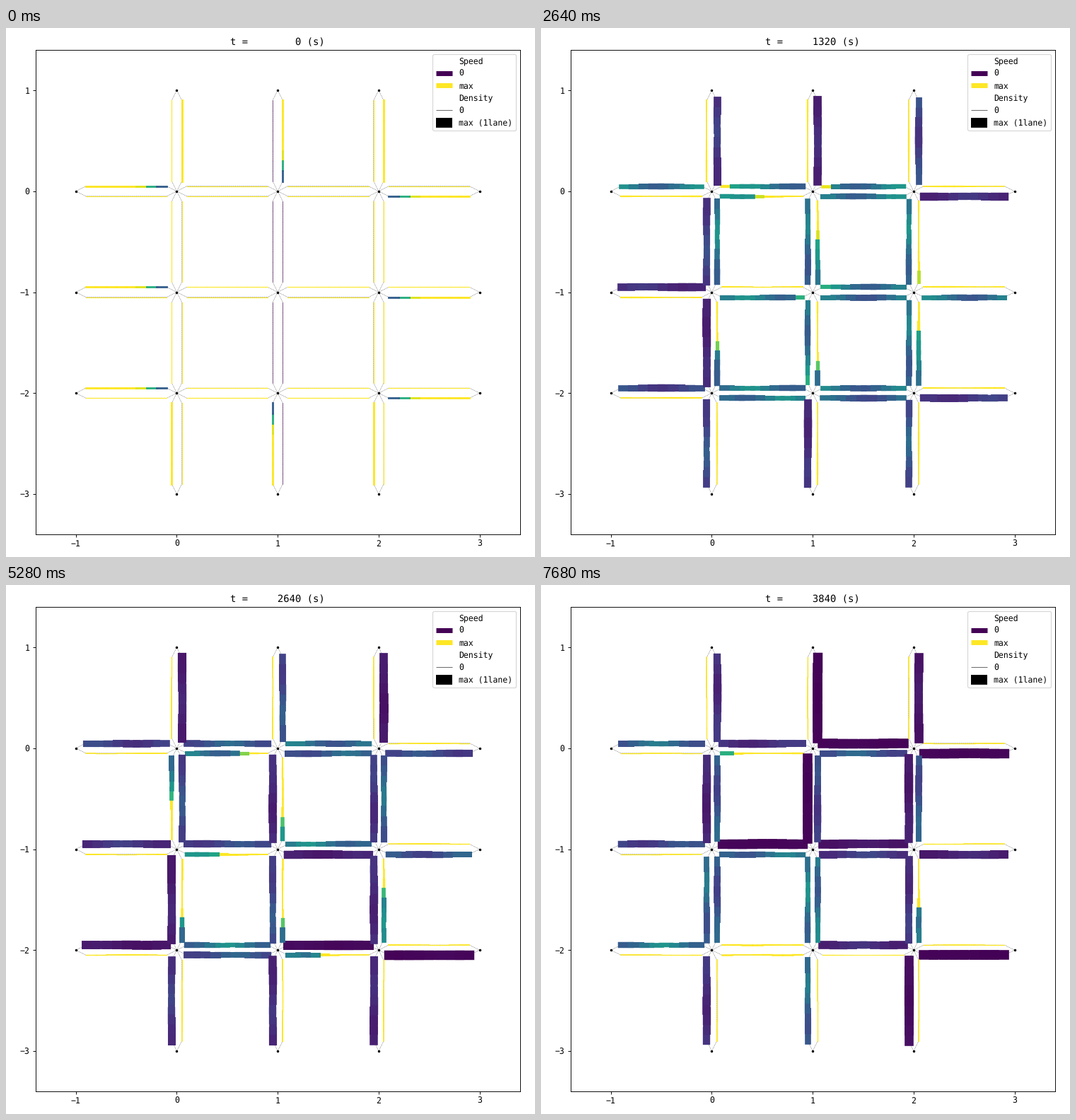
A matplotlib script for the animation above (7920 ms loop, 748 by 748 pixels).

```python
import matplotlib.pyplot as plt
import numpy as np
from matplotlib.animation import FuncAnimation
from matplotlib.collections import LineCollection
from matplotlib.lines import Line2D

SIZE = 748
FRAMES, INTERVAL, STEP = 33, 240, 120
KEYS = [0, 7, 17, 24, 32]
CELLS = 8
MIN_W, MAX_W = 0.5, 12
HEADING = {"N": (0, 1), "S": (0, -1), "E": (1, 0), "W": (-1, 0)}
START = {"N": -3, "S": 1, "E": -1, "W": 3}

plt.rcParams.update({"font.family": "DejaVu Sans Mono", "text.hinting": "none"})
viridis = plt.colormaps["viridis"]
rng = np.random.default_rng(4)

lanes, paths, levels, queued = [], [], [], []


def road(x, y, way, loads, queue=False):
    """One-way road leaving node (x, y), with its load in percent at KEYS."""
    dx, dy = HEADING[way]
    s = np.linspace(0.1, 0.9, CELLS + 1)
    mid = np.column_stack([x + dx * s - dy * 0.05, y + dy * s + dx * 0.05])
    lanes.extend(np.stack([mid[:-1], mid[1:]], axis=1))
    paths.append(np.vstack([(x, y), mid, (x + dx, y + dy)]))
    levels.append(np.array(loads) / 100)
    queued.append(queue)


def street(way, line, entry, first, second):
    """Entry road, two inner roads and a free-flowing exit in a row."""
    dx, dy = HEADING[way]
    idle = dy != 0 and line == 1
    inside = 0 if idle else 4
    chain = [(17, *entry), (inside, *first), (inside, *second), (inside, 11, 9, 8, 7)]
    for i, loads in enumerate(chain):
        pos = START[way] + i * (dx + dy)
        x, y = (pos, line) if dx else (line, pos)
        road(x, y, way, loads, queue=i == 0 and (dx != 0 or idle))


street("E", 0, (42, 60, 74, 57), (15, 65, 60, 76), (28, 49, 58, 97))
street("E", -1, (97, 46, 86, 67), (4, 15, 88, 97), (53, 17, 60, 88))
street("E", -2, (69, 66, 96, 49), (24, 82, 40, 14), (28, 93, 95, 79))
street("W", 0, (83, 68, 66, 97), (38, 58, 60, 62), (10, 46, 25, 17))
street("W", -1, (54, 54, 66, 82), (42, 76, 86, 72), (25, 54, 12, 55))
street("W", -2, (60, 92, 98, 98), (86, 20, 25, 4), (72, 19, 80, 14))
street("S", 0, (67, 82, 84, 77), (30, 57, 70, 62), (26, 26, 20, 62))
street("S", 1, (92, 62, 66, 98), (26, 30, 18, 68), (27, 8, 25, 54))
street("S", 2, (63, 75, 92, 88), (9, 27, 70, 62), (24, 38, 24, 24))
street("N", 0, (65, 66, 76, 77), (73, 90, 80, 57), (68, 71, 10, 82))
street("N", 1, (71, 84, 75, 57), (8, 84, 58, 42), (48, 65, 85, 98))
street("N", 2, (69, 50, 92, 93), (44, 70, 82, 74), (20, 76, 72, 85))

levels = np.array(levels)
queued = np.array(queued)[:, None]
phase = rng.uniform(0, 2 * np.pi, (len(levels), 1))
pos = (np.arange(CELLS) + 0.5) / CELLS


def density(n):
    """Queues grow back from the road's end; stop-and-go waves run upstream."""
    load = np.array([np.interp(n, KEYS, row) for row in levels])[:, None]
    free = np.minimum(load, 0.12)
    if n == 0:
        return load + 0 * pos
    fill = np.clip((load - 0.1) / 0.35, 0, 1)
    front = 1.25 - 1.6 * fill
    k = free + (np.maximum(load, 0.52) - free) / (1 + np.exp((front - pos) / 0.06))
    wave = np.sin(2 * np.pi * (pos + n / 6) + phase)
    return k + 0.3 * k * (1 - k) * wave


def speed(k, n):
    """Speed relative to free flow; empty roads have none."""
    if n == 0:
        head = np.clip(0.3 + 2.6 * (pos[-1] - pos), 0, 1)
        return np.where(queued, head, k > 0)
    return np.clip(0.42 * (1 / np.maximum(k, 0.01) - 1), 0, 1)


fig = plt.figure(figsize=(9, 9), dpi=SIZE / 9, facecolor="white")
ax = fig.add_axes([41.7 / SIZE, 32 / SIZE, 685 / SIZE, 685 / SIZE])
ax.set(xlim=(-1.4, 3.4), ylim=(-3.4, 1.4), xticks=range(-1, 4), yticks=range(-3, 2))
title = ax.set_title("")

for x in range(-1, 4):
    for y in range(-3, 2):
        if 0 <= x <= 2 or -2 <= y <= 0:
            ax.plot(x, y, "ko", ms=2, zorder=10)
for p in paths:
    ax.plot(p[:, 0], p[:, 1], "k--", lw=0.25, zorder=5)
flow = LineCollection(lanes, capstyle="projecting", zorder=6)
ax.add_collection(flow, autolim=False)


def key(label, color, lw):
    return Line2D([], [], color=color, lw=lw, label=label, solid_capstyle="butt")


ax.legend(loc="upper right", handles=[
    key("Speed", "none", 0), key("0", viridis(0.0), 6), key("max", viridis(1.0), 6),
    key("Density", "none", 0), key("0", "k", MIN_W), key("max (1lane)", "k", MAX_W),
])


def update(n):
    k = density(n)
    flow.set_linewidths(MIN_W + (MAX_W - MIN_W) * k.ravel())
    flow.set_colors(viridis(speed(k, n).astype(float).ravel()))
    title.set_text(f"t = {n * STEP:>8} (s)")
    return flow, title


anim = FuncAnimation(fig, update, frames=FRAMES, interval=INTERVAL, repeat=True)
plt.show()
```
